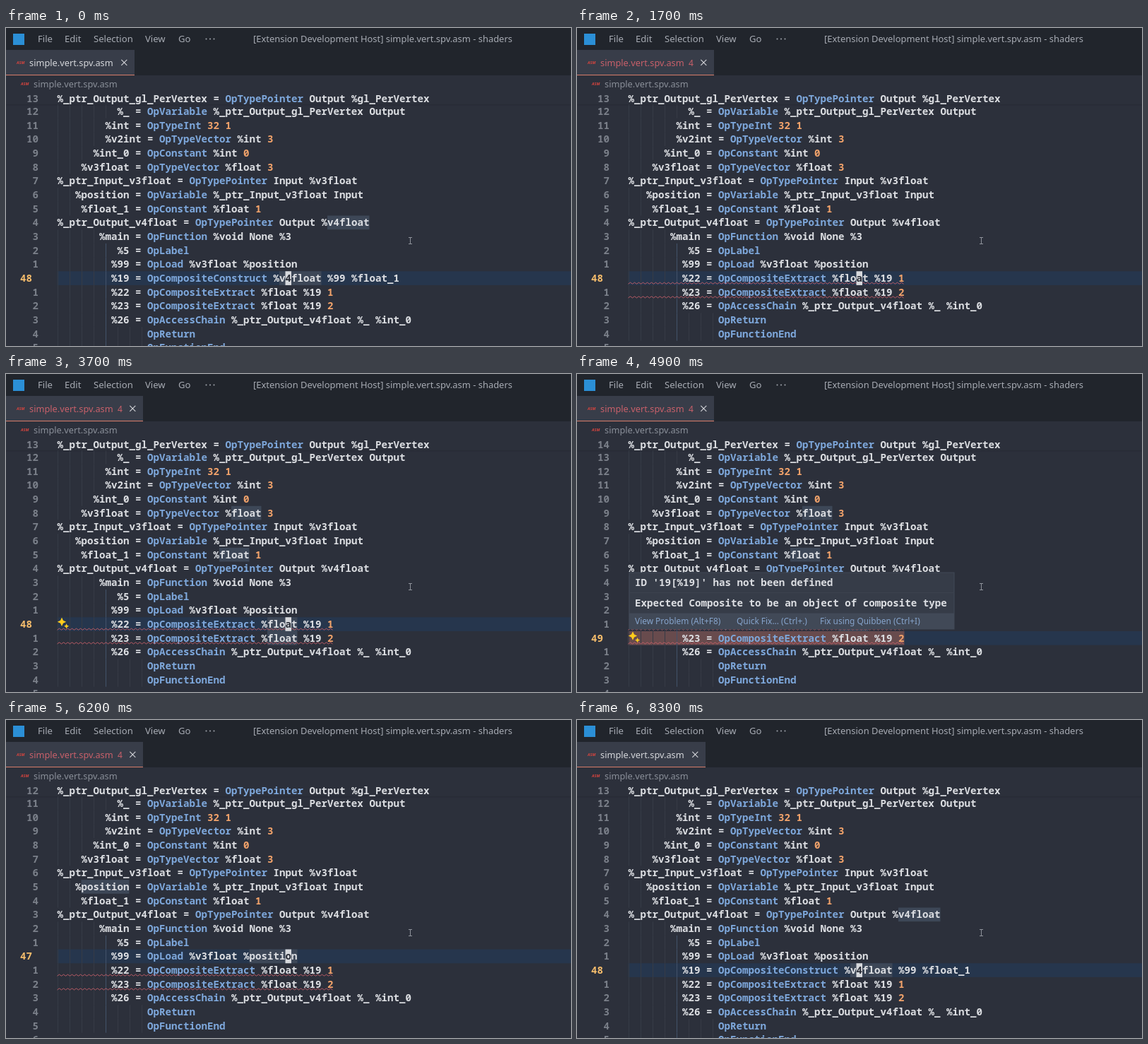
An HTML page with a canvas that plays this animation: 800 by 450 pixels, repeating every 8400 ms.

```html
<!DOCTYPE html>
<html lang="en">
<head>
<meta charset="utf-8">
<title>Shader editor</title>
<style>
html, body { margin: 0; width: 100%; height: 100%; overflow: hidden; background: #2c303b; }
canvas { display: block; width: 800px; height: 450px; }
</style>
</head>
<body>
<canvas id="stage" width="800" height="450"></canvas>
<script>
const ctx = document.getElementById('stage').getContext('2d');
const LOOP = 8400, BLINK = 500;
const LEFT = 72.5, CHAR = 8.5, ROW = 19.68, FIRST = 36, FIRST_Y = 117.9;
const CURSOR_COL = 38;
const MONO = '600 14.17px "Noto Sans Mono", monospace';
const ui = size => `${size}px "Noto Sans", sans-serif`;
const C = {
  bar: '#21252c', editor: '#2c303b', tab: '#383d49', accent: '#cf7a68',
  text: '#dcdee2', op: '#7ea8dc', num: '#f2a36b', lineNo: '#7b808a',
  activeNo: '#f6bd6c', lineBg: '#26364d', word: '#3d4757', error: '#c8606a',
  menu: '#a7abb3', dim: '#8a8f99', white: '#d5d7db',
  panel: '#363c48', raised: '#414957', errorBg: '#684b4d'
};

const sticky = '%_ptr_Output_gl_PerVertex = OpTypePointer Output %gl_PerVertex';
const source = [
  [10, '%_ = OpVariable %_ptr_Output_gl_PerVertex Output'],
  [8, '%int = OpTypeInt 32 1'],
  [8, '%v2int = OpTypeVector %int 3'],
  [6, '%int_0 = OpConstant %int 0'],
  [4, '%v3float = OpTypeVector %float 3'],
  [0, '%_ptr_Input_v3float = OpTypePointer Input %v3float'],
  [3, '%position = OpVariable %_ptr_Input_v3float Input'],
  [4, '%float_1 = OpConstant %float 1'],
  [0, '%_ptr_Output_v4float = OpTypePointer Output %v4float'],
  [7, '%main = OpFunction %void None %3'],
  [10, '%5 = OpLabel'],
  [9, '%99 = OpLoad %v3float %position'],
  [9, '%19 = OpCompositeConstruct %v4float %99 %float_1'],
  [9, '%22 = OpCompositeExtract %float %19 1'],
  [9, '%23 = OpCompositeExtract %float %19 2'],
  [9, '%26 = OpAccessChain %_ptr_Output_v4float %_ %int_0'],
  [15, 'OpReturn'],
  [15, 'OpFunctionEnd'],
  [0, '']
].map(([indent, code]) => ' '.repeat(indent) + code);
const cutSource = source.filter(s => !s.includes('%19 ='));

// Each entry changes part of the editor state from its time on.
const events = [
  [0, { cur: 48, cut: false, dirty: false, err: false, word: 'v4float', spark: false, cmd: null, hover: false, blink: 0 }],
  [100, { cut: true, dirty: true, word: '', blink: 200 }],
  [400, { word: 'float' }],
  [1200, { cmd: '', word: '' }],
  [1400, { cmd: 'w' }],
  [1600, { cmd: null, dirty: false, blink: 1500 }],
  [1700, { err: true }],
  [1900, { word: 'float', spark: true }],
  [4000, { cur: 49, word: '', spark: false, blink: 4000 }],
  [4200, { word: 'float' }],
  [4400, { spark: true, hover: true }],
  [5000, { hover: false }],
  [5300, { cur: 48, spark: false, blink: 5300 }],
  [5500, { spark: true }],
  [5800, { cur: 47, word: '', spark: false, blink: 5800 }],
  [6100, { word: 'position' }],
  [6400, { cut: false, cur: 48, dirty: true, word: '', blink: 6400 }],
  [6600, { spark: true }],
  [6700, { cmd: '' }],
  [6900, { cmd: 'w' }],
  [7300, { cmd: null, dirty: false, blink: 7300 }],
  [7500, { err: false, spark: false }],
  [7600, { word: 'v4float' }]
];

const stateAt = t => Object.assign({}, ...events.filter(e => e[0] <= t).map(e => e[1]));
const rowY = line => FIRST_Y + (line - FIRST) * ROW;
const colX = col => LEFT + col * CHAR;

function rect(x, y, w, h, color) {
  ctx.fillStyle = color;
  ctx.fillRect(x, y, w, h);
}

function text(str, x, y, font, color, align = 'left') {
  ctx.font = font;
  ctx.fillStyle = color;
  ctx.textAlign = align;
  ctx.fillText(str, x, y);
}

function dot(x, y, r, color) {
  ctx.fillStyle = color;
  ctx.beginPath();
  ctx.arc(x, y, r, 0, 7);
  ctx.fill();
}

function stroke(points, color, width) {
  ctx.strokeStyle = color;
  ctx.lineWidth = width;
  ctx.beginPath();
  points.forEach(([x, y], i) => i ? ctx.lineTo(x, y) : ctx.moveTo(x, y));
  ctx.stroke();
}

function codeText(str, y) {
  for (const m of str.matchAll(/\S+/g)) {
    const color = /^Op/.test(m[0]) ? C.op : /^\d+$/.test(m[0]) ? C.num : C.text;
    text(m[0], colX(m.index), y + 5, MONO, color);
  }
}

function lineNumber(line, cur, y) {
  if (line === cur) text(line, 20, y + 5, MONO, C.activeNo);
  else text(Math.abs(line - cur), 46, y + 5, MONO, C.lineNo, 'right');
}

function guides(str, y) {
  const indent = str.search(/\S/);
  for (let col = 0; col < indent; col += 2) {
    const active = col === 8 && y > 300;
    rect(Math.round(colX(col)), y - ROW / 2, 1, ROW, active ? '#43526a' : '#363b46');
  }
}

function squiggle(str, y) {
  const points = [];
  for (let x = LEFT, i = 0; x < colX(str.length); x += 3, i++) {
    points.push([x, y + (i % 2 ? 6 : 8.2)]);
  }
  stroke(points, C.error, 0.9);
}

function star(x, y, r) {
  ctx.fillStyle = '#ffcc1c';
  ctx.beginPath();
  for (let i = 0; i < 8; i++) {
    const a = i * Math.PI / 4, d = i % 2 ? r * 0.45 : r;
    ctx.lineTo(x + d * Math.cos(a), y + d * Math.sin(a));
  }
  ctx.fill();
}

function drawCode(s, t) {
  const lines = s.cut ? cutSource : source;
  const cursorOn = s.cmd === null && Math.floor((t - s.blink) / BLINK) % 2 === 0;
  lines.forEach((str, i) => {
    const line = FIRST + i, y = rowY(line), top = y - ROW / 2;
    const current = line === s.cur;
    const broken = s.err && (/Extract/.test(str) || /%19 =/.test(str));
    if (current) rect(LEFT, top, 800, ROW, C.lineBg);
    if (s.word) {
      for (const m of str.matchAll(new RegExp('%' + s.word + '\\b', 'g'))) {
        rect(colX(m.index + 1), top, s.word.length * CHAR, ROW, C.word);
      }
    }
    if (current && s.hover) rect(LEFT, top, str.length * CHAR, ROW, C.errorBg);
    guides(str, y);
    codeText(str, y);
    if (broken) squiggle(str, y);
    lineNumber(line, s.cur, y);
    if (current && cursorOn) {
      rect(colX(CURSOR_COL), top, CHAR, ROW, '#d6d8dc');
      text(str[CURSOR_COL], colX(CURSOR_COL), y + 5, MONO, '#2a2e38');
    }
    if (current && s.spark) {
      star(79, y - 3.3, 6.2);
      star(85.6, y + 2.8, 3.6);
    }
  });
  rect(0, 90, 800, 18, C.editor);
  rect(0, 108, 800, 1.5, 'rgba(20,23,30,.15)');
  codeText(sticky, 99.8);
  lineNumber(FIRST - 1, s.cur, 99.8);
}

function asmIcon(x, y) {
  text('ASM', x, y, 'italic bold 5.6px "Noto Sans", sans-serif', '#d8453f');
}

function drawChrome(s) {
  rect(0, 0, 800, 67, C.bar);
  rect(10, 8, 16, 16, '#2b8fd6');
  [['File', 45], ['Edit', 83], ['Selection', 124], ['View', 197], ['Go', 244]]
    .forEach(([label, x]) => text(label, x, 20.3, ui(13.1), C.menu));
  for (let i = 0; i < 3; i++) dot(283.5 + i * 5.5, 15.5, 1, C.menu);
  const mark = s.dirty ? '● ' : '';
  text(`[Extension Development Host] ${mark}simple.vert.spv.asm - shaders`, 533.5, 20.3, ui(12.95), C.menu, 'center');

  const width = s.err ? 194 : 182, closeX = width - 14.7;
  rect(0, 31, width, 36, C.tab);
  rect(0, 66, width, 1.3, C.accent);
  asmIcon(15, 51.2);
  text('simple.vert.spv.asm', 33, 53.8, ui(12.8), s.err ? C.error : C.white);
  if (s.err) text('4', 158, 53.8, ui(12), C.error);
  if (s.dirty) dot(closeX, 48.8, 4.3, '#c9cbd0');
  else {
    stroke([[closeX - 4, 44.8], [closeX + 4, 52.8]], C.white, 1.1);
    stroke([[closeX + 4, 44.8], [closeX - 4, 52.8]], C.white, 1.1);
  }

  rect(0, 67.3, 800, 22.7, C.editor);
  asmIcon(21, 81);
  text('simple.vert.spv.asm', 39, 83.7, ui(12.8), C.dim);
}

function drawHover() {
  rect(73.5, 280.5, 461, 81, C.raised);
  rect(74.5, 281.5, 459, 57, C.panel);
  rect(74.5, 309, 459, 1, '#3c424e');
  text("ID '19[%19]' has not been defined", 82, 300, MONO, C.text);
  text('Expected Composite to be an object of composite type', 82, 328.8, MONO, C.text);
  [['View Problem (Alt+F8)', 82], ['Quick Fix... (Ctrl+.)', 226], ['Fix using Quibben (Ctrl+I)', 344]]
    .forEach(([label, x]) => text(label, x, 354, ui(11.9), '#86a4cc'));
}

function drawPalette(cmd) {
  ctx.save();
  ctx.shadowColor = 'rgba(0,0,0,.4)';
  ctx.shadowBlur = 8;
  rect(222, 31, 623, 67, C.panel);
  ctx.restore();
  rect(222, 31, 623, 26, C.raised);
  text('⌘ VIM Command Line:', 533.5, 48.4, ui(12.9), C.white, 'center');
  rect(229, 65.5, 609, 25.5, '#203049');
  text(cmd, 236, 82.6, ui(12.9), C.white);
  rect(236 + ctx.measureText(cmd).width, 70.5, 1, 15, C.white);
}

function drawPointer() {
  const x = 572.5, color = '#8f939b';
  rect(x - 0.5, 297, 1, 8, color);
  rect(x - 2.5, 296, 5, 1, color);
  rect(x - 2.5, 305, 5, 1, color);
}

function frame(now) {
  const t = now % LOOP, s = stateAt(t);
  rect(0, 0, 800, 450, C.editor);
  drawCode(s, t);
  drawChrome(s);
  if (s.hover) drawHover();
  if (s.cmd !== null) drawPalette(s.cmd);
  drawPointer();
  requestAnimationFrame(frame);
}
requestAnimationFrame(frame);
</script>
</body>
</html>
```
